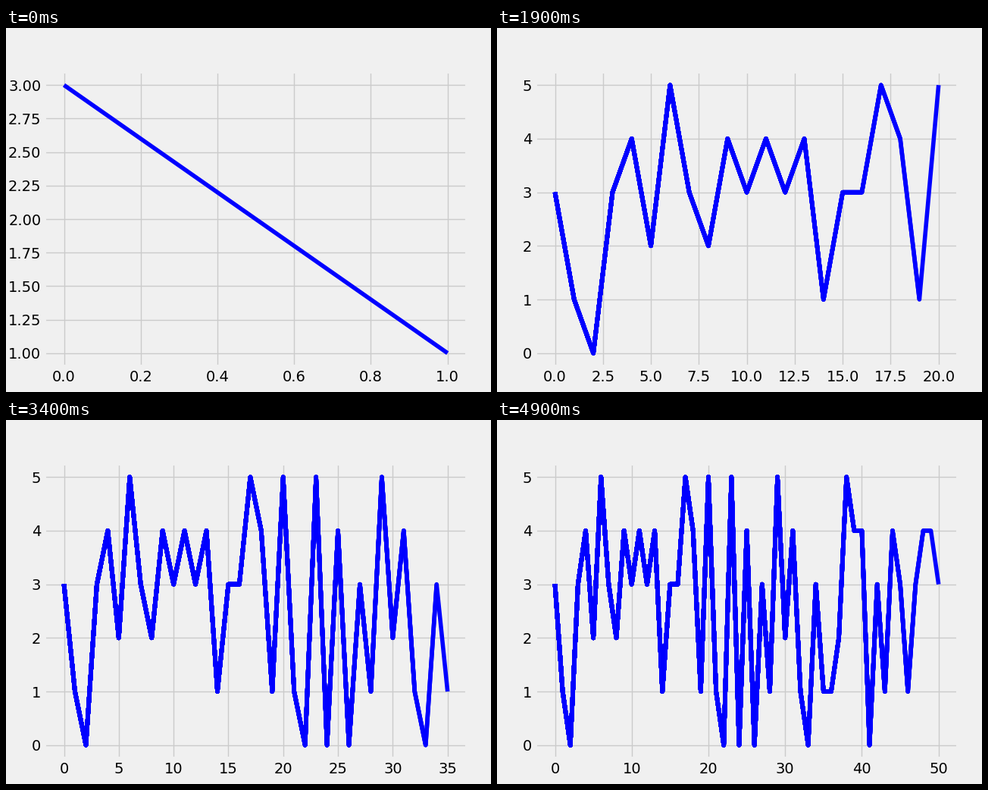
Write a matplotlib script that moves like this. It is 640 px wide and 480 px high and loops after 5 s.

```python
import matplotlib.pyplot as plt
from matplotlib.animation import FuncAnimation

FRAMES = 50
INTERVAL_MS = 100

plt.style.use("fivethirtyeight")

# One reading per step, each between 0 and 5.
READINGS = [int(digit) for digit in
            "310342532434341335415105040315241031125440314313443"]

fig, ax = plt.subplots(figsize=(6.4, 4.8), dpi=100)


def draw(frame):
    """Plot every partial series so far; the overlap thickens older segments."""
    ax.clear()
    for count in range(2, frame + 3):
        ax.plot(range(count), READINGS[:count], color="blue")
    return ax.lines


anim = FuncAnimation(fig, draw, frames=FRAMES, interval=INTERVAL_MS,
                     init_func=lambda: draw(0), repeat=True, repeat_delay=0)

plt.show()
```
